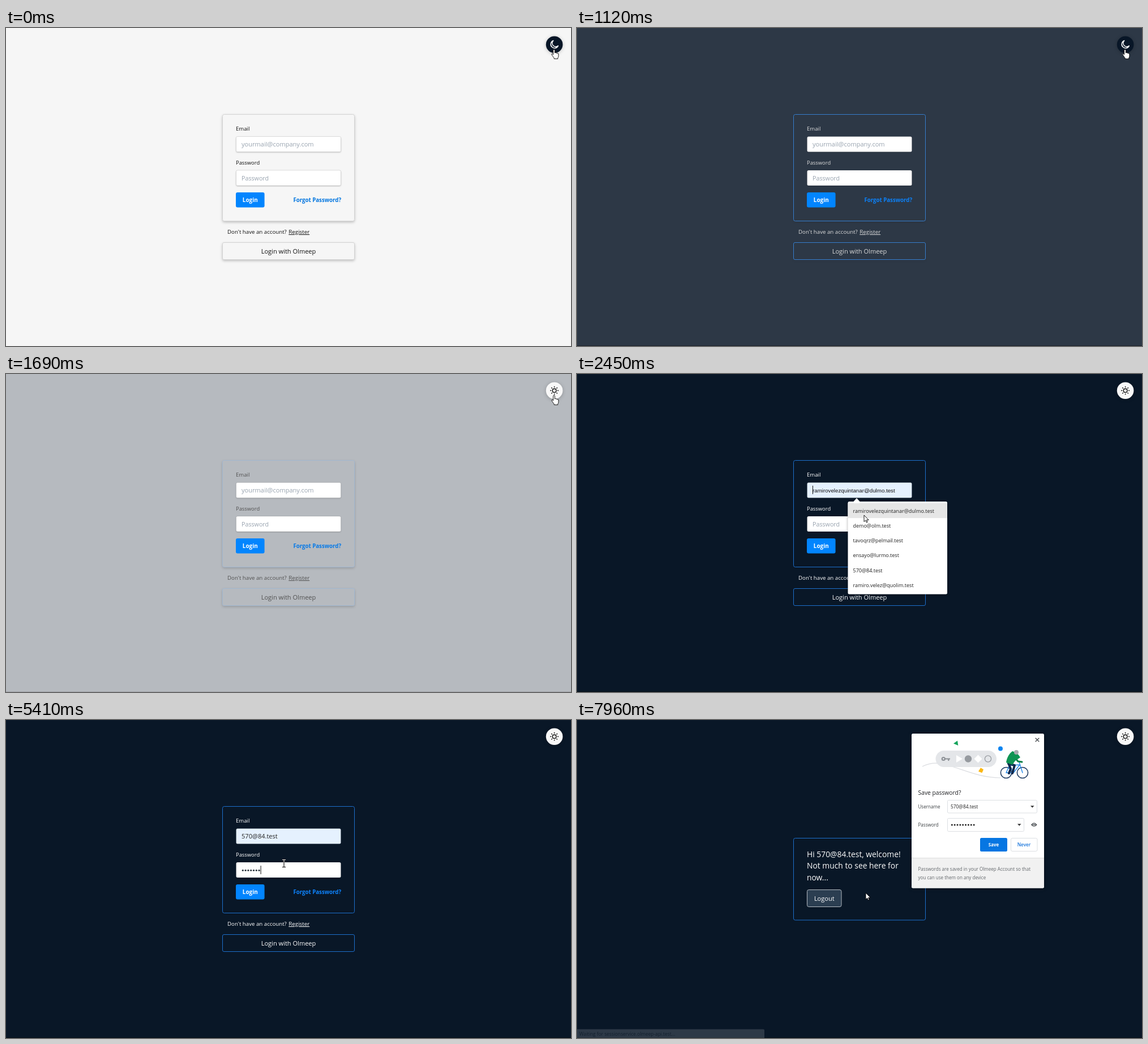
Write an HTML page that moves like this. It is 998 by 561 pixels and loops after 8000 ms.

```html
<!DOCTYPE html>
<html lang="en">
<head>
<meta charset="utf-8">
<title>Login</title>
<style>
  html, body { margin: 0; width: 100%; height: 100%; overflow: hidden; }
  svg { display: block; width: 100%; height: 100%; background: var(--bg); font-family: "Open Sans", "Noto Sans", sans-serif; }
  text { white-space: pre; }
  .card { fill: var(--bg); stroke: var(--line); filter: drop-shadow(0 2px 2px rgba(0, 0, 0, var(--shade))); }
  .input { fill: #fff; stroke: rgba(0, 0, 0, .1); filter: drop-shadow(0 1px 1px rgba(0, 0, 0, var(--shade))); }
  .ink { fill: var(--ink); }
  .small { font-size: 9.6px; }
  .body { font-size: 11.05px; }
  .bold { font-weight: 700; }
  .hint { fill: #98a3af; }
  .big { font-size: 13.87px; }
  .tiny { font-size: 8.05px; fill: #3c4043; }
  .box { fill: #fff; stroke: #dcdfe3; }
  .pointer { fill: #fff; stroke: #000; stroke-width: .9; stroke-linejoin: round; }
</style>
</head>
<body>
<svg id="stage" viewBox="0 0 998 561">
  <rect id="edge" y="560" width="998" height="1"/>

  <g id="toggle" transform="translate(968.6 29.2)">
    <circle id="disc" r="14.8" style="filter:drop-shadow(0 1px 3px rgba(0,0,0,.22))"/>
    <path id="moon" d="M6.7 2.2A6.8 6.8 0 1 1-1.8-6.9A5.9 5.9 0 0 0 6.7 2.2z" fill="none" stroke="#fff" stroke-width="1.5" stroke-linejoin="round"/>
    <g id="sun" fill="none" stroke="#111" stroke-width="1.5" stroke-linecap="round">
      <circle r="3.3"/>
      <path id="rays"/>
    </g>
  </g>

  <g id="login">
    <rect class="card" x="382.5" y="152.5" width="233" height="188" rx="3"/>
    <text class="ink small" x="406" y="181">Email</text>
    <rect id="email" class="input" x="406.5" y="191.5" width="185" height="27" rx="2.5"/>
    <text id="emailText" class="body" x="416" y="209"></text>
    <text class="ink" x="406" y="241" font-size="9.4">Password</text>
    <rect class="input" x="406.5" y="251" width="185" height="27" rx="2.5"/>
    <text id="passHint" class="hint" x="416" y="269" font-size="10.7">Password</text>
    <g id="dots" fill="#26303a"></g>
    <rect id="caret" width="1" height="15" fill="#111"/>
    <rect id="submit" x="406" y="290" width="50.6" height="26.5" rx="3"/>
    <text class="bold" x="431.3" y="307" font-size="9.96" fill="#fff" text-anchor="middle">Login</text>
    <text class="bold" x="592" y="307" font-size="9.7" fill="var(--link)" text-anchor="end">Forgot Password?</text>
    <text class="ink" x="391" y="363" font-size="9.7">Don't have an account?</text>
    <text class="ink" x="499.3" y="363" font-size="9.75" text-decoration="underline">Register</text>
    <rect class="card" x="382.5" y="378.5" width="233" height="30" rx="2.5"/>
    <text class="ink body" x="499" y="398" text-anchor="middle">Login with Olmeep</text>
  </g>

  <g id="list">
    <g style="filter:drop-shadow(0 1px 2px rgba(0,0,0,.35))">
      <path d="M487.5 226L494 219L500.5 226z" fill="#fff"/>
      <rect x="478.5" y="225" width="175.5" height="163.5" rx="2.5" fill="#fff"/>
    </g>
    <rect id="hover" x="478.5" width="175.5" height="26.2" fill="#e6e6e6"/>
    <g id="rows" font-size="9" fill="#222"></g>
  </g>

  <g id="welcome">
    <rect class="card" x="382.5" y="208.5" width="233" height="144.5" rx="3"/>
    <text class="ink big" x="406" y="242"><tspan id="greeting"></tspan></text>
    <text class="ink big" x="406" y="262.4">Not much to see here for</text>
    <text class="ink big" x="406" y="282.8">now...</text>
    <rect x="406.5" y="299.5" width="60.5" height="30" rx="3" fill="#2b3e51" stroke="#b4bac1"/>
    <text class="body" x="436.8" y="318.6" fill="#fff" text-anchor="middle">Logout</text>
  </g>

  <g id="bubble">
    <rect x="591" y="24" width="234" height="272.5" rx="2.5" fill="#fff" style="filter:drop-shadow(0 1px 3px rgba(0,0,0,.4))"/>
    <path d="M591 243.5H825V294a2.5 2.5 0 0 1-2.5 2.5H593.5a2.5 2.5 0 0 1-2.5-2.5z" fill="#f1f1f1"/>
    <path d="M591 243.5H825" stroke="#dedede"/>
    <path d="M809.7 31.7l6.6 6.6m0-6.6l-6.6 6.6" stroke="#4a4d51" stroke-width="1.4"/>

    <path d="M610 82Q630 72 651 79C684 87 706 101 748 102" fill="none" stroke="#dadce0" stroke-width="1.2"/>
    <rect x="633.5" y="54" width="107.5" height="29" rx="14.5" fill="#e4e6e9"/>
    <g fill="none" stroke="#8d9196" stroke-width="2.2">
      <circle cx="647.3" cy="68.5" r="2.5"/>
      <path d="M650 68.5H659M656.3 68.5V72"/>
    </g>
    <path d="M670 62L681 68.5L670 75z M708.5 61.5l7 7l-7 7l-7-7z" fill="#fff"/>
    <circle cx="691" cy="68.5" r="6.2" fill="#969a9f"/>
    <circle cx="726" cy="68.5" r="5.6" fill="none" stroke="#969a9f" stroke-width="1.3"/>
    <path d="M665 41.5L672 36.5L673.3 45z" fill="#16a45c"/>
    <path d="M713 84.3l5 3-2.5 6-6.5-2.5z" fill="#fbb713"/>
    <circle cx="748" cy="50.5" r="4" fill="#0a84f0"/>
    <g fill="none" stroke-linecap="round" stroke-linejoin="round">
      <g stroke="#17345c" stroke-width="1.5">
        <circle cx="758" cy="93" r="9.6"/>
        <circle cx="787" cy="93" r="9.6"/>
      </g>
      <path d="M758 93L764 80L782 79L771 93H758M764 80L771 93M787 93L781 74H786" stroke="#1f86e8" stroke-width="1.4"/>
      <path d="M762 77L773 80L769 94M762 76L766 86L763 94" stroke="#10294d" stroke-width="4"/>
      <path d="M773 66L779 73L786 74" stroke="#0c7f46" stroke-width="3"/>
    </g>
    <path d="M769 55Q778 57 783 66L774 72L769 79L758 75Q760 62 769 55z" fill="#0f9453"/>
    <circle cx="776" cy="57" r="4" fill="#a7abaf"/>

    <text x="602.5" y="131.5" font-size="10.3" fill="#202124">Save password?</text>
    <text class="tiny" x="602.5" y="156">Username</text>
    <text class="tiny" x="602.5" y="188">Password</text>
    <rect class="box" x="654.5" y="141.5" width="158" height="22.5" rx="2"/>
    <rect class="box" x="654.5" y="173.5" width="135" height="23" rx="2"/>
    <text id="savedUser" x="660" y="156" font-size="8.4" fill="#222"></text>
    <g id="savedDots" fill="#222"></g>
    <path d="M801 151.2h6.6l-3.3 3.5zM778 183.2h6.6l-3.3 3.5z" fill="#333"/>
    <path d="M802 184.8Q807.3 177.7 812.6 184.8Q807.3 191.9 802 184.8z" fill="#45494d"/>
    <circle cx="807.3" cy="184.8" r="2.4" fill="#fff"/>
    <circle cx="807.3" cy="184.8" r="1.4" fill="#45494d"/>
    <rect x="712" y="208" width="48" height="24" rx="2.5" fill="#0676e2"/>
    <text class="bold" x="736" y="222.7" font-size="7.9" fill="#fff" text-anchor="middle">Save</text>
    <rect class="box" x="766.5" y="208.5" width="46.5" height="23" rx="2.5"/>
    <text x="789.5" y="222.7" font-size="8.2" font-weight="600" fill="#1a76dc" text-anchor="middle">Never</text>
    <text class="tiny" x="602.5" y="266" style="fill:#63676b">Passwords are saved in your Olmeep Account so that</text>
    <text class="tiny" x="602.5" y="280.5" style="fill:#63676b">you can use them on any device</text>
  </g>

  <g id="status">
    <path d="M0 545.5H329a2 2 0 0 1 2 2V561H0z" fill="#dee1e6"/>
    <text class="tiny" x="4" y="557" style="font-size:8.3px">Waiting for sessionservice.olmeep-api.test...</text>
  </g>

  <path id="arrow" class="pointer" d="M0 0V11.6L2.7 9.1L4.4 13L6.2 12.2L4.5 8.4H8.2z"/>
  <path id="hand" class="pointer" d="M-1.4 1.2a1.4 1.4 0 0 1 2.8 0V6l1-.6q1.4-.3 1.6.9 1.2-.7 1.9.5 1.8-.4 2 1.2V11.5q0 2-1.2 3.2V16.3H.2V15q-1.5-1.6-2.6-3.6L-4.4 8.6q.4-1.6 1.8-.8l1.2 1.2z"/>
  <path id="beam" d="M-3-6.5H-.7L0-6L.7-6.5H3M0-6V6M-3 6.5H-.7L0 6L.7 6.5H3" fill="none" stroke="#fff" stroke-width="1.1" style="mix-blend-mode:difference"/>
</svg>
<script>
const LOOP = 8000;
const FADE = 500;
const ROW_TOP = 228, ROW_H = 26.3;
const USER = '570@84.test';
const MAILS = ['ramirovelezquintanar@dulmo.test', 'demo@olm.test', 'tavoqrz@pelmail.test',
  'ensayo@lurmo.test', USER, 'ramiro.velez@quolim.test'];
const TOGGLES = [125, 1055, 1597];
const KEYSTROKES = [4530, 4600, 4770, 5000, 5080, 5240, 5410, 5480, 5640];
// time, x, y, pointer shape from here on
const PATH = [
  [0, 968, 38, 'hand'], [1930, 968, 38, 'arrow'], [2150, 500, 206, 'beam'], [2440, 500, 206, 'beam'],
  [2450, 507, 249, 'arrow'], [2840, 507, 345, 'arrow'], [3050, 507, 345, 'arrow'], [3330, 495, 270, 'beam'],
  [3540, 491, 254, 'beam'], [3780, 491, 254, 'beam'], [3790, 491, 253, 'beam'], [5960, 491, 253, 'beam'],
  [6180, 474, 280, 'arrow'], [6300, 452, 294, 'hand'], [6560, 436, 303, 'hand'], [6750, 436, 303, 'hand'],
  [6800, 455, 314, 'arrow'], [6840, 461, 318, 'arrow'], [7080, 506, 348, 'arrow'],
  [7260, 506, 348, 'arrow'], [7480, 510, 305, 'arrow']
];

const el = {};
document.querySelectorAll('[id]').forEach(n => el[n.id] = n);
const set = (node, attrs) => { for (const k in attrs) node.setAttribute(k, attrs[k]); };
const show = (node, on) => { node.style.display = on ? '' : 'none'; };
const clamp = v => Math.min(1, Math.max(0, v));
const ramp = (t, from, to) => clamp((t - from) / (to - from));
const mix = (a, b, k) => a + (b - a) * k;
const blend = (a, b, k) => `rgb(${a.map((v, i) => Math.round(mix(v, b[i], k)))})`;

// CSS "ease": cubic-bezier(.25, .1, .25, 1)
function ease(x) {
  let lo = 0, hi = 1, u = x;
  for (let i = 0; i < 24; i++) {
    u = (lo + hi) / 2;
    const bx = .75 * u * (1 - u) + u ** 3;
    if (bx < x) lo = u; else hi = u;
  }
  return .3 * u * (1 - u) ** 2 + 3 * u * u * (1 - u) + u ** 3;
}

function add(parent, tag, attrs, text = '') {
  const n = document.createElementNS('http://www.w3.org/2000/svg', tag);
  set(n, attrs);
  n.textContent = text;
  parent.append(n);
}

function build() {
  let rays = '';
  for (let i = 0; i < 8; i++) {
    const c = Math.cos(i * Math.PI / 4), s = Math.sin(i * Math.PI / 4);
    rays += `M${c * 6} ${s * 6}L${c * 6.9} ${s * 6.9}`;
  }
  set(el.rays, { d: rays });
  MAILS.forEach((m, i) => add(el.rows, 'text', { x: 487.5, y: 244.5 + i * ROW_H }, m));
  KEYSTROKES.forEach((_, i) => {
    add(el.dots, 'circle', { cx: 418.3 + i * 4.8, cy: 265.2, r: 1.55 });
    add(el.savedDots, 'circle', { cx: 662.3 + i * 4.85, cy: 185, r: 1.5 });
  });
  el.greeting.textContent = `Hi ${USER}, welcome!`;
  el.savedUser.textContent = USER;
}

function pointerAt(t) {
  let i = PATH.length - 1;
  while (PATH[i][0] > t) i--;
  const a = PATH[i], b = PATH[i + 1] || a;
  const k = a === b ? 0 : ramp(t, a[0], b[0]);
  return { x: Math.round(mix(a[1], b[1], k)), y: Math.round(mix(a[2], b[2], k)), kind: a[3] };
}

function drawTheme(t) {
  const flips = TOGGLES.filter(s => t >= s);
  const dark = flips.length % 2 === 1;
  const k = flips.length ? ease(ramp(t, flips.at(-1), flips.at(-1) + FADE)) : 1;
  const light = dark ? 1 - k : k;
  const vars = {
    bg: blend([9, 23, 39], [246, 246, 246], light),
    line: blend([28, 111, 204], [211, 211, 211], light),
    ink: blend([255, 255, 255], [17, 17, 17], light),
    link: blend([14, 132, 255], [0, 117, 224], light),
    shade: .22 * light
  };
  for (const v in vars) el.stage.style.setProperty('--' + v, vars[v]);
  set(el.edge, { opacity: .45 * (1 - light) });
  set(el.disc, { fill: dark ? '#f8f8f8' : '#081627' });
  show(el.sun, dark);
  show(el.moon, !dark);
}

function drawEmail(t, p) {
  const open = t >= 2190 && t < 3060;
  const row = open && t >= 2450 ? Math.floor((p.y - ROW_TOP) / ROW_H) : -1;
  const chosen = t >= 3060;
  const preview = row >= 0;
  show(el.list, open);
  show(el.hover, preview);
  if (preview) set(el.hover, { y: ROW_TOP + row * ROW_H });
  el.email.style.fill = preview || chosen ? '#e5f1fe' : '#fff';
  el.emailText.textContent = preview ? MAILS[row] : chosen ? USER : 'yourmail@company.com';
  el.emailText.style.cssText = preview
    ? 'font:9.74px "Liberation Sans",sans-serif;fill:#111'
    : `fill:${chosen ? '#222' : '#98a3af'}`;
  return open;
}

function drawPassword(t, listOpen) {
  const typed = KEYSTROKES.filter(s => t >= s).length;
  [...el.dots.children].forEach((d, i) => show(d, i < typed));
  show(el.passHint, !typed);
  const focused = (t >= 3480 && t < 3940) || (t >= 4530 && t < 6140);
  show(el.caret, listOpen || focused);
  set(el.caret, { x: 416 + typed * 4.8, y: listOpen ? 197 : 257 });
}

function draw(t) {
  const p = pointerAt(t);
  drawTheme(t);
  drawPassword(t, drawEmail(t, p));
  const press = ramp(t, 6300, 6420) * (1 - ramp(t, 6850, 7060));
  set(el.submit, { fill: blend([2, 133, 254], [0, 100, 238], press) });

  const inside = t >= 7440;
  show(el.login, !inside);
  show(el.welcome, inside);
  set(el.bubble, { opacity: ramp(t, 7640, 7800) });
  set(el.status, { opacity: .17 * ramp(t, 7880, 7950) });

  for (const kind of ['arrow', 'hand', 'beam']) {
    show(el[kind], kind === p.kind);
    set(el[kind], { transform: `translate(${p.x} ${p.y})` });
  }
}

build();
const start = performance.now();
function tick() {
  draw((performance.now() - start) % LOOP);
  requestAnimationFrame(tick);
}
tick();
</script>
</body>
</html>
```
